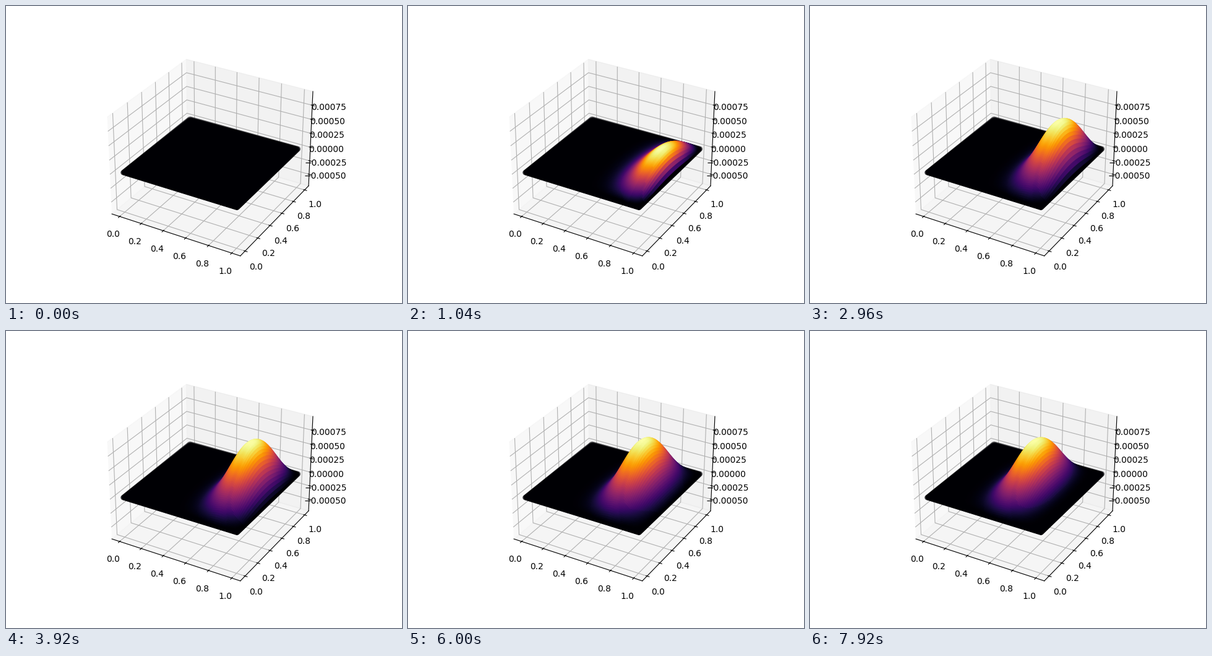
Write a matplotlib script that moves like this. It is 640 by 480 pixels and loops after 8 s.

```python
import numpy as np
import matplotlib.pyplot as plt
from matplotlib.animation import FuncAnimation

FRAMES, INTERVAL = 100, 80
POINTS = 100
SPEED = 0.042        # wave speed, units per second
RATE = 4.17e-4       # peak initial velocity
SKEW = 11
MODES = np.arange(1, 81)


def kick(x):
    """Initial velocity along x: a skewed bump close to the x = 1 edge."""
    shape = lambda s: s**SKEW * (1 - s)
    return RATE * shape(x) / shape(SKEW / (SKEW + 1))


# Sine series of the kick; the membrane is clamped on all four edges.
fine = np.linspace(0, 1, 2001)
coeffs = 2 * np.sin(np.pi * np.outer(MODES, fine)) @ kick(fine) * (fine[1] - fine[0])
omega = SPEED * np.pi * np.sqrt(MODES**2 + 1)

axis = np.linspace(0, 1, POINTS)
X, Y = np.meshgrid(axis, axis)
basis = np.sin(np.pi * np.outer(axis, MODES))
profile_y = np.sin(np.pi * axis)


def height(t):
    profile_x = basis @ (coeffs * np.sin(omega * t) / omega)
    return np.outer(profile_y, profile_x)


def padded(low, high):
    """Widen limits by the usual 3D view margin."""
    pad = (high - low) / 48
    return low - pad, high + pad


fig = plt.figure(figsize=(6.4, 4.8), dpi=100)
ax = fig.add_subplot(projection="3d")
ax.set_xlim(*padded(-0.05, 1.05))
ax.set_ylim(*padded(-0.05, 1.05))
ax.set_zlim(*padded(-0.000683, 0.000957))
ax.zaxis.set_major_locator(plt.MultipleLocator(0.00025))
ax.set_autoscale_on(False)
cloud = None


def draw(frame):
    global cloud
    if cloud is not None:
        cloud.remove()
    z = height(frame * INTERVAL / 1000).ravel()
    cloud = ax.scatter(X.ravel(), Y.ravel(), z, c=z, cmap="inferno",
                       s=35.7, linewidths=0)
    return (cloud,)


anim = FuncAnimation(fig, draw, frames=FRAMES, init_func=lambda: draw(0),
                     interval=INTERVAL, repeat=True, repeat_delay=0)
plt.show()
```
